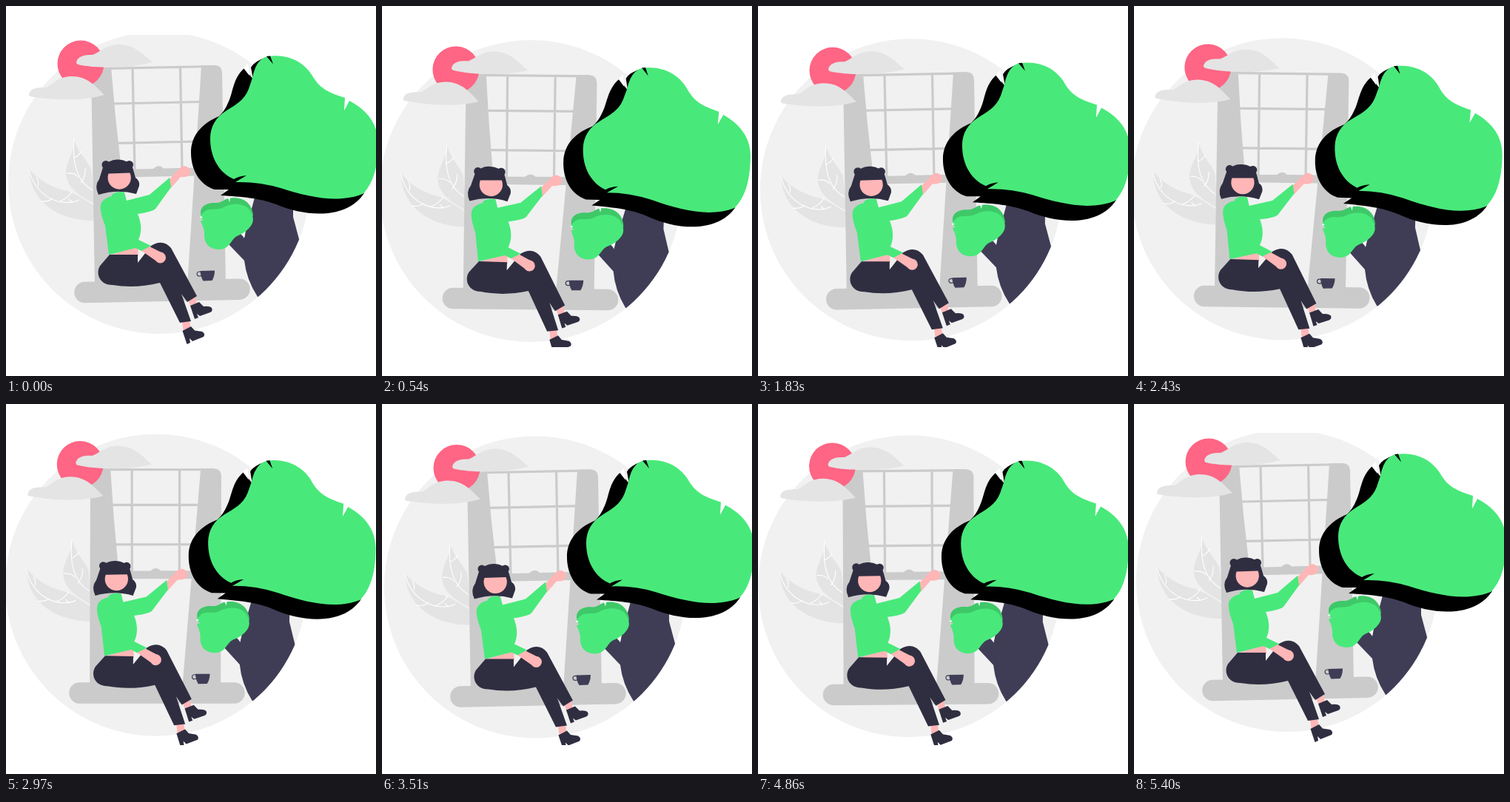
Write an HTML page that moves like this. It is 500x500 px and loops after 5.43 s.

```html
<!DOCTYPE html>
<html lang="en">
<head>
<meta charset="utf-8">
<title>Window seat</title>
<style>
  html, body { margin: 0; width: 100%; height: 100%; overflow: hidden; background: #fff; }
  svg { display: block; width: 100vw; height: 100vh; }
  .wall { fill: #f1f1f1; }
  .frame { fill: #cbcbcb; }
  .bar { fill: none; stroke: #cbcbcb; stroke-width: 3.2; }
  .pale { fill: #e4e4e4; }
  .vein { fill: none; stroke: #fff; stroke-width: 1.1; }
  .ink { fill: #2f2e41; }
  .bark { fill: #3f3d56; }
  .skin { fill: #ffb6b6; }
  .green { fill: #48e97a; }
  .shade { fill: #3ec868; }
  .white { fill: #fff; }
</style>
</head>
<body>
<svg viewBox="0 0 500 500">
  <defs>
    <clipPath id="stage"><rect y="39" width="500" height="422"/></clipPath>
    <clipPath id="disc"><circle cx="207" cy="239" r="204"/></clipPath>
  </defs>
  <g clip-path="url(#stage)">
    <g id="scene">
      <circle class="wall" cx="207" cy="239" r="204"/>

      <g id="plant">
        <path class="pale" d="M31 220C42 234 62 246 83 250C95 254 106 262 120 270V290C84 291 34 274 31 220Z"/>
        <path class="pale" d="M92 178C95 196 108 206 115 220L121 268C102 258 82 247 81 226C81 208 93 200 92 178Z"/>
        <path class="vein" d="M31 221C36 243 50 258 70 264Q86 268 99 262M47 264Q57 265 63 260M73 264Q83 260 89 251M41 231Q45 236 43 243M90 266L85 261"/>
        <path class="vein" d="M92 179C89 210 94 236 117 249M92 205Q99 202 102 196M82 226Q93 225 97 231M101 239Q108 230 107 219"/>
      </g>

      <g id="window">
        <path class="frame" d="M115 86L142 83L148 150L156 222L166 300V380H120Z"/>
        <path class="frame" d="M264 80.500L282 80Q291.500 80 292 90L297 378H245Z"/>
        <path class="bar" d="M128 84.600L282 81.500M171 84L174 224M235.500 82L238 222M146 132L263 129.500M151 185.300L260 183"/>
        <path class="frame" d="M155 221L199 220Q206 213 213 219.500L256 218.500V229.500L156 231.500Z"/>
        <path d="M106.500 387L315.500 382.700" stroke="#cbcbcb" stroke-width="28.500" stroke-linecap="round"/>
      </g>

      <circle cx="101" cy="78" r="31.500" fill="#ff6584"/>
      <path class="pale" d="M95 76C97 67 107 66 117 66C128 62 134 52 154 52C176 53 185 66 198 76C170 84 123 85 97 79Q95 78 95 76Z"/>
      <path class="pale" d="M31 120C32 110 45 110 55 110C65 104 70 96 88 95C111 95 121 109 133 120C105 129 59 127 32 122Z"/>

      <g id="mug">
        <path class="bark" d="M262.500 358L282 357.500Q282 365 278.500 371L266.500 371.500Q263 366 262.500 358Z"/>
        <ellipse cx="261.500" cy="362" rx="3.400" ry="3" fill="none" stroke="#3f3d56" stroke-width="1.200"/>
      </g>

      <g id="woman">
        <path class="skin" d="M246 397L256 391L258 405L250 408ZM238 426L248 425L250 438L240 441Z"/>
        <path class="skin" d="M138 338L178 325L179 338Z"/>
        <path class="ink" d="M140 336H178V347L196 324Q212 314 223 327L258 392L245 400L237 389L250 426L235 428L208 374C184 380 163 380 144 377C124 377 121 358 128 350Z"/>
        <path class="ink" d="M249 405L261 400L267 406Q275 405 278 408Q280 412 276 414L262 419L258 416L260 421L255 423Z"/>
        <path class="ink" d="M238.500 439L250 433L255 438.500L265 440Q270 443 267 447L252 453L248 449L249 455L244.500 457Z"/>
        <path class="skin" d="M182 330L191 323.500L212 334L205 346Z"/>
        <circle class="skin" cx="208.500" cy="340" r="7.500"/>
        <path class="skin" d="M219 236L235 219Q240 215 244 217Q251 220 248 227Q245 232 236 231L223 246Z"/>
        <path class="ink" d="M131 218Q139 207 151 207.500Q164 207 171 218L175 232Q181 236 180 243L176 254Q151 247 125 255Q119 243 126 234Z"/>
        <circle class="ink" cx="135" cy="214.500" r="5.500"/>
        <circle class="ink" cx="166.500" cy="214.500" r="5.500"/>
        <path class="skin" d="M138.500 226.500L167.500 225.500A15.700 15.700 0 1 1 138.500 226.500Z"/>
        <path class="green" d="M143 255Q151 249 160 252L163 263L194 255L221 232L223 245L202 274Q198 278 178 281Q186 300 179 316L196 324L183 331L175 327L139 336L134 297Q125 274 129 266Q133 259 143 257Z"/>
      </g>

      <g id="tree">
        <path class="bark" clip-path="url(#disc)" d="M337 255H388V285L396 315L412 330L375 393H340Q325 370 322 344L300 321L313 304L322 313L325 300Z"/>
        <path class="shade" d="M264 284C260 272 270 265 284 266Q290 266 297 261C316 255 333 264 334 283L322 296L280 292Z"/>
        <path class="green" d="M265 281C273 271 281 277 292 273C306 265 321 267 328 274Q338 287 331 297Q325 306 312 311C303 316 303 329 287 329Q270 328 268 312Q269 302 263 291L267 289L262 285Z"/>
        <path class="white" d="M300 259L303 259L302 265ZM262 284L266 285L263 287ZM319 308L323 306L322 314Z"/>

        <path d="M322 84C306 98 307 118 300 131Q296 141 288 149C266 158 250 174 250 198C250 222 262 242 282 248L301 248L290 256C320 258 340 259 365 268C405 285 460 289 484 253L380 130L361 78L352 69Q335 75 331 83L334 99Z"/>
        <path class="green" d="M333 97Q336 81 343 74Q348 69 354 68C381 64 404 76 415 96C425 112 436 117 458 124L457 141L464 128C487 140 502 158 502.500 183C503 211 499 236 483 253.500C451 267 411 259 371 246Q341 237 310 238L325 229Q314 230 308 234C289 226 276 206 276 179C276 163 284 150 297 142C309 134 322 128 328 112Z"/>
        <path d="M352 68L361 78.500L357 67.500Z"/>
        <path class="white" d="M321 84L327 78L329 94L332 98Z"/>
        <path class="white" d="M460 123L457 141L464.500 127Z"/>
      </g>
    </g>
  </g>
</svg>
<script>
  const LOOP = 5430, SPAN = 5400;
  const SWAY = 1800, FLOAT = 2700;
  const scene = document.getElementById("scene");

  const bezier = (s, a, b) => 3 * (1 - s) ** 2 * s * a + 3 * (1 - s) * s * s * b + s ** 3;

  function ease(x) {
    let low = 0, high = 1;
    for (let i = 0; i < 20; i++) {
      const mid = (low + high) / 2;
      if (bezier(mid, 0.36, 0.25) < x) low = mid; else high = mid;
    }
    return bezier(low, 0.1, 1);
  }

  // Out during the first half, back during the second, each half eased on its own.
  function sway(time) {
    const phase = (time % SWAY) / SWAY * 2;
    return phase < 1 ? ease(phase) : 1 - ease(phase - 1);
  }

  const float = time => (1 - Math.cos(time / FLOAT * 2 * Math.PI)) / 2;

  function draw(now) {
    const time = Math.min(now % LOOP, SPAN);
    const tilt = sway(time);
    const drop = 9.2 * tilt + 12.8 * float(time);
    scene.setAttribute("transform", `translate(0 ${drop.toFixed(3)}) rotate(${(2 * tilt).toFixed(4)} 250 39)`);
  }

  const start = performance.now();
  function tick() {
    draw(performance.now() - start);
    requestAnimationFrame(tick);
  }
  tick();
</script>
</body>
</html>
```
